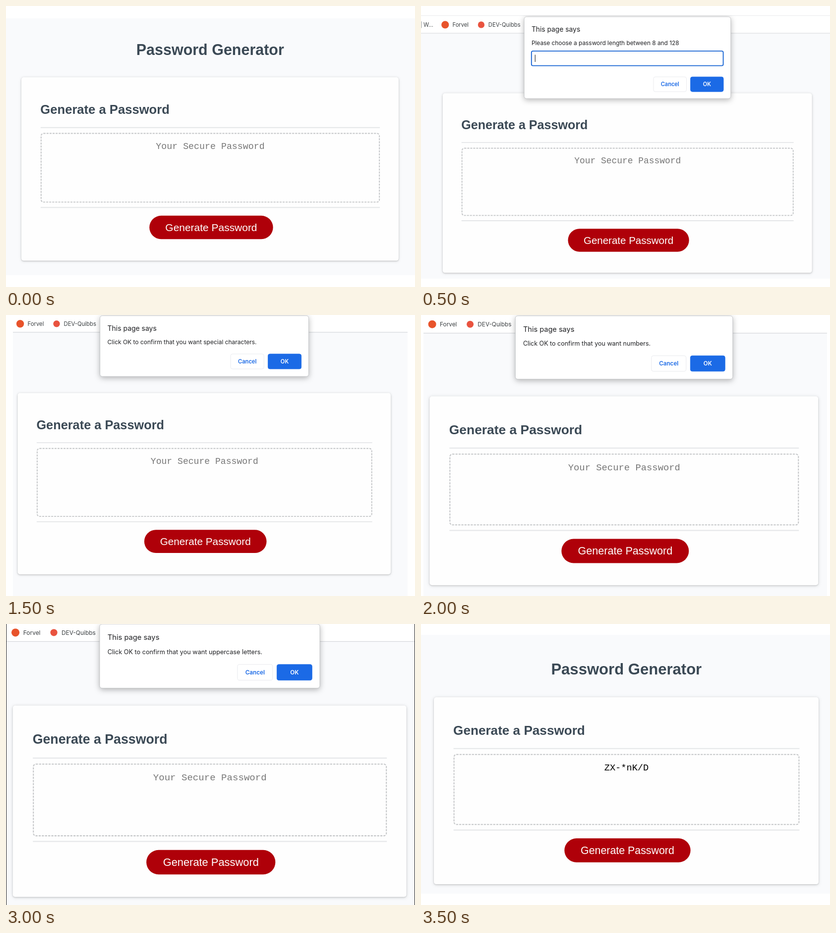
Write an HTML page that moves like this. It is 825x568 px and loops after 4 s.

```html
<!DOCTYPE html>
<html lang="en">
<head>
<meta charset="utf-8">
<title>Password Generator</title>
<style>
  html, body { margin: 0; width: 100%; height: 100%; overflow: hidden; background: #fff; }
  #stage { display: block; width: 825px; height: 568px; }
  text { font-family: Inter, Roboto, sans-serif; fill: #202124; white-space: pre; }
  .scene { visibility: hidden; animation: show 4s step-end infinite; animation-delay: calc(var(--i) * .5s - 4s); }
  @keyframes show {
    0% { visibility: visible; }
    12.5%, 100% { visibility: hidden; }
  }
  .mid { text-anchor: middle; }
  .head { font: bold 26.4px "Liberation Sans", Arial, sans-serif; fill: #3b4955; }
  .title { font-size: 31.4px; }
  .mono { font: 18.85px "Liberation Mono", "Courier New", monospace; fill: #777; }
  .mono.done { fill: #000; }
  .cta { font: 21.6px "Liberation Sans", Arial, sans-serif; fill: #fff; }
  .bookmark { font-size: 11.8px; fill: #3c4043; }
  .says { font-size: 14.55px; }
  .body { font-size: 12.5px; }
  .label { font-size: 11.6px; font-weight: 600; }
  .card { fill: #fefefe; filter: drop-shadow(0 1px 1px rgba(60,64,67,.2)) drop-shadow(0 1px 3px rgba(60,64,67,.2)); }
  .box { fill: #fff; stroke: #b9bbbe; stroke-width: .8; filter: drop-shadow(0 3px 6px rgba(0,0,0,.28)); }
</style>
</head>
<body>
<svg id="stage" viewBox="0 0 825 568">
  <defs>
    <g id="card">
      <rect class="card" width="784" height="382" rx="5"/>
      <text class="head" x="39.5" y="76.6">Generate a Password</text>
      <path d="M40 104.8H745M40 271.2H745" stroke="#e4e6e8" stroke-width="2"/>
      <rect x="41" y="117" width="703" height="143" rx="5" fill="none" stroke="#c4c6c8" stroke-width="2" stroke-dasharray="4.2 2.1"/>
      <rect x="266" y="288.3" width="257" height="48.8" rx="24.4" fill="#af0009"/>
      <text class="cta mid" x="394.5" y="320.2">Generate Password</text>
    </g>
    <g id="bar">
      <path d="M-100-200H900V-127.7H-100Z" fill="#fff"/>
      <path d="M-100-165H900" stroke="#e9eaec"/>
      <path d="M-100-127.7H900" stroke="#d5d8dc" stroke-width="1.2"/>
      <text class="bookmark" x="-20" y="-141.2" text-anchor="end">| W...</text>
      <circle cx="5.3" cy="-145.6" r="8" fill="#e8532b"/>
      <text class="bookmark" x="20.8" y="-141.2">Forvel</text>
      <circle cx="81.8" cy="-145.6" r="7" fill="#e9533f"/>
      <text class="bookmark" x="97" y="-141.2">DEV-Quibbs</text>
    </g>
  </defs>
</svg>
<script>
  const ask = what => ({ text: `Click OK to confirm that you want ${what}.`, cancel: true });

  // at: scale and card corner; page: left, top, right, bottom
  const scenes = [
    { at: [.9707, 31, 144], page: [0, 25, 825, 544] },
    { at: [.9503, 43.7, 176.3], page: [0, 18, 825, 551],
      dialog: { text: 'Please choose a password length between 8 and 128', cancel: true, input: true } },
    { at: [.963, 22.3, 158], page: [14, 0, 810, 568],
      dialog: { text: 'Your password will have 8 characters.' } },
    { at: [.96, 23.5, 157.5], page: [14, 0, 810, 568], dialog: ask('special characters') },
    { at: [1, 17.3, 164.3], page: [5, 0, 819, 568], dialog: ask('numbers') },
    { at: [1.012, 14.5, 168], page: [0, 0, 825, 568], dialog: ask('lowercase letters') },
    { at: [1.0128, 13.7, 164.8], page: [0, 0, 825, 568], dialog: ask('uppercase letters'), edges: true },
    { at: [.9898, 26, 148], page: [0, 22, 825, 545], password: 'ZX-*nK/D' }
  ];

  const button = (x, y, w, label, fill, ink, line) => `
    <rect x="${x}" y="${y}" width="${w}" height="31.5" rx="4" fill="${fill}" stroke="${line}" stroke-width=".8"/>
    <text class="label mid" x="${x + w / 2}" y="${y + 19.9}" style="fill:${ink}">${label}</text>`;

  function dialogBox({ text, cancel, input }) {
    const y = input ? -34.8 : -82;
    const w = cancel ? 70 : 63;
    return `
      <rect class="box" x="173" y="-162.6" width="438.5" height="${input ? 174 : 128}" rx="5"/>
      <text class="says" x="188.6" y="-130.8">This page says</text>
      <text class="body" x="188.6" y="-102.6">${text}</text>
      ${input ? `<rect x="188.5" y="-89.6" width="407" height="31" rx="3" fill="#fff" stroke="#1a66d4" stroke-width="2"/>
        <path d="M196.3-82V-66.5" stroke="#111" stroke-width="1.1"/>` : ''}
      ${cancel ? button(447.5, y, 70, 'Cancel', '#fff', '#1b6ae6', '#e3e5ea') : ''}
      ${button(596 - w, y, w, 'OK', '#1b6ae6', '#fff', '#1b6ae6')}`;
  }

  function scene({ at: [s, x, y], page: [l, t, r, b], dialog, password, edges }, i) {
    return `
      <svg class="scene" style="--i:${i}" x="${l}" y="${t}" width="${r - l}" height="${b - t}" viewBox="${l} ${t} ${r - l} ${b - t}">
        <rect x="${l}" y="${t}" width="${r - l}" height="${b - t}" fill="#f9fafc"/>
        <g transform="translate(${x} ${y}) scale(${s})">
          ${dialog ? '<use href="#bar"/>' : '<text class="head title mid" x="392.3" y="-46.8">Password Generator</text>'}
          <use href="#card"/>
          <text class="mono mid ${password ? 'done' : ''}" x="392.5" y="149.6">${password || 'Your Secure Password'}</text>
          ${dialog ? dialogBox(dialog) : ''}
        </g>
        ${edges ? '<path d="M.5 0V568M824.5 0V568" stroke="#222"/>' : ''}
      </svg>`;
  }

  document.getElementById('stage').insertAdjacentHTML('beforeend', scenes.map(scene).join(''));
</script>
</body>
</html>
```
